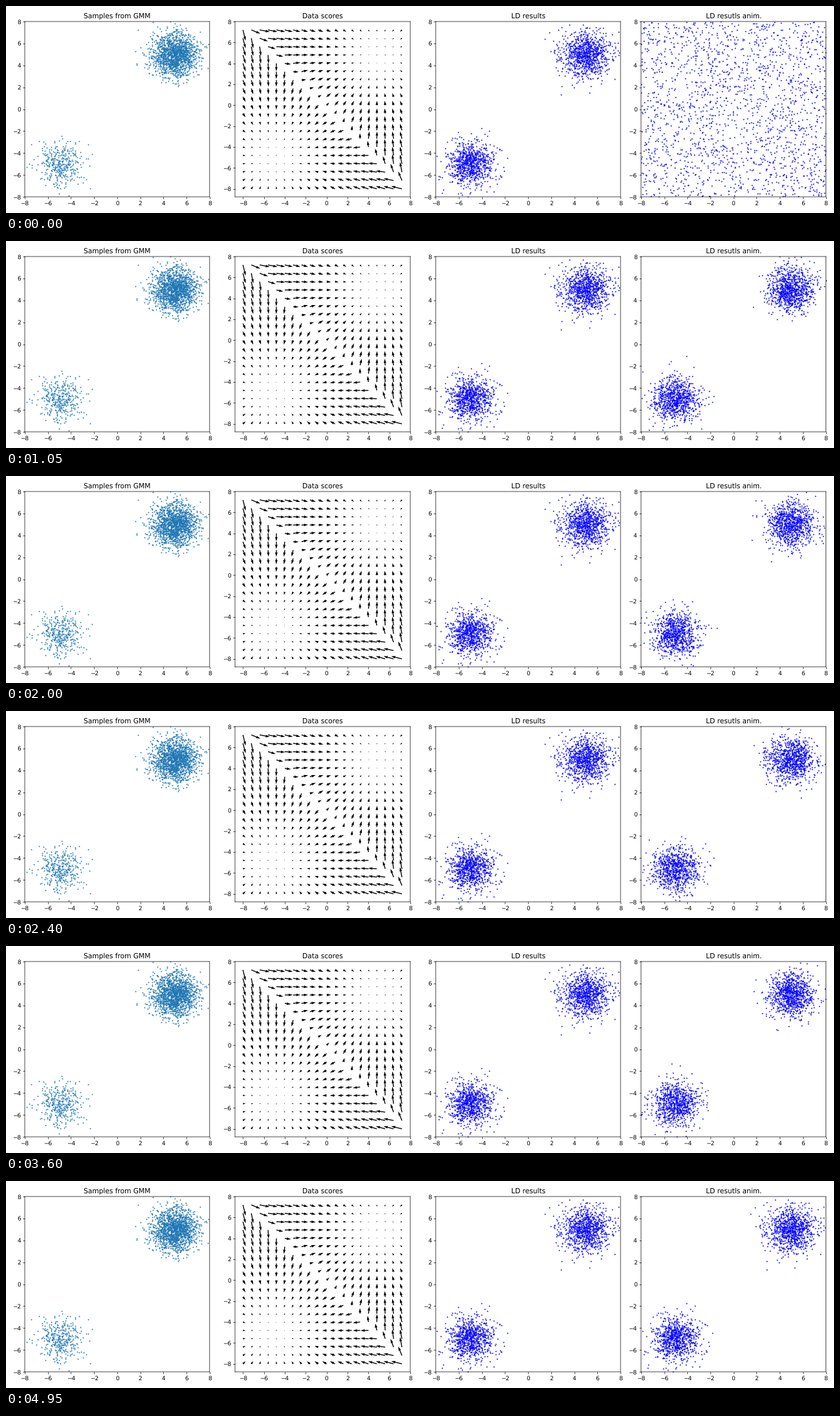
Write a matplotlib script that moves like this. It is 1280 px wide and 320 px high and loops after 5 s.

```python
import numpy as np
import matplotlib.pyplot as plt
from matplotlib.animation import FuncAnimation

W, H, DPI = 1280, 320, 64
FRAMES, STEPS_PER_FRAME, RATE = 100, 10, 0.1
SAMPLES, PARTICLES, LIMIT = 2000, 1850, 8
MODES = np.array([[5.0, 5.0], [-5.0, -5.0]])
WEIGHTS = np.array([0.8, 0.2])

# Soft, unsnapped edges and unhinted text
plt.rcParams.update({"path.snap": False, "text.hinting": "none"})
rng = np.random.default_rng(7)


def score(p):
    """Gradient of the log density of the two-component mixture."""
    diff = MODES[None] - p[:, None]
    logw = np.log(WEIGHTS) - 0.5 * (diff ** 2).sum(-1)
    resp = np.exp(logw - logw.max(1, keepdims=True))
    resp /= resp.sum(1, keepdims=True)
    return (resp[..., None] * diff).sum(1)


def sample_mixture(n):
    which = rng.choice(2, n, p=WEIGHTS)
    return MODES[which] + rng.normal(size=(n, 2))


def langevin(n):
    """Particle positions at every frame, starting from a uniform square."""
    p = rng.uniform(-LIMIT, LIMIT, (n, 2))
    path = [p]
    for _ in range(FRAMES - 1):
        for _ in range(STEPS_PER_FRAME):
            noise = rng.normal(size=p.shape)
            p = p + RATE / 2 * score(p) + np.sqrt(RATE) * noise
        path.append(p)
    return np.array(path)


fig = plt.figure(figsize=(W / DPI, H / DPI), dpi=DPI)


def panel(i, title, low, high):
    left, top, width, height = 29 + 317.6 * i, 24, 285.8, 271
    ax = fig.add_axes([left / W, 1 - (top + height) / H, width / W, height / H])
    ax.set_title(title)
    ticks = np.arange(-8, high + 0.1, 2)
    ax.set(xlim=(low, high), ylim=(low, high), xticks=ticks, yticks=ticks)
    return ax


def cloud(i, title, points, color):
    ax = panel(i, title, -LIMIT, LIMIT)
    return ax.scatter(*points.T, s=1.2, color=color)


def vector_field(i, title):
    axis = np.arange(20) * 0.8 - 8
    margin = 0.05 * (axis[-1] - axis[0])
    ax = panel(i, title, axis[0] - margin, axis[-1] + margin)
    grid = np.stack(np.meshgrid(axis, axis), -1).reshape(-1, 2)
    ax.set_aspect("equal")
    ax.quiver(*grid.T, *score(grid).T, width=0.005)


path = langevin(PARTICLES)
cloud(0, "Samples from GMM", sample_mixture(SAMPLES), "C0")
vector_field(1, "Data scores")
cloud(2, "LD results", path[-1], "blue")
dots = cloud(3, "LD resutls anim.", path[0], "blue")


def update(k):
    dots.set_offsets(path[k])
    return dots,


anim = FuncAnimation(fig, update, frames=FRAMES, interval=1000 / 20,
                     init_func=lambda: update(0), repeat=True, repeat_delay=0)
plt.show()
```
